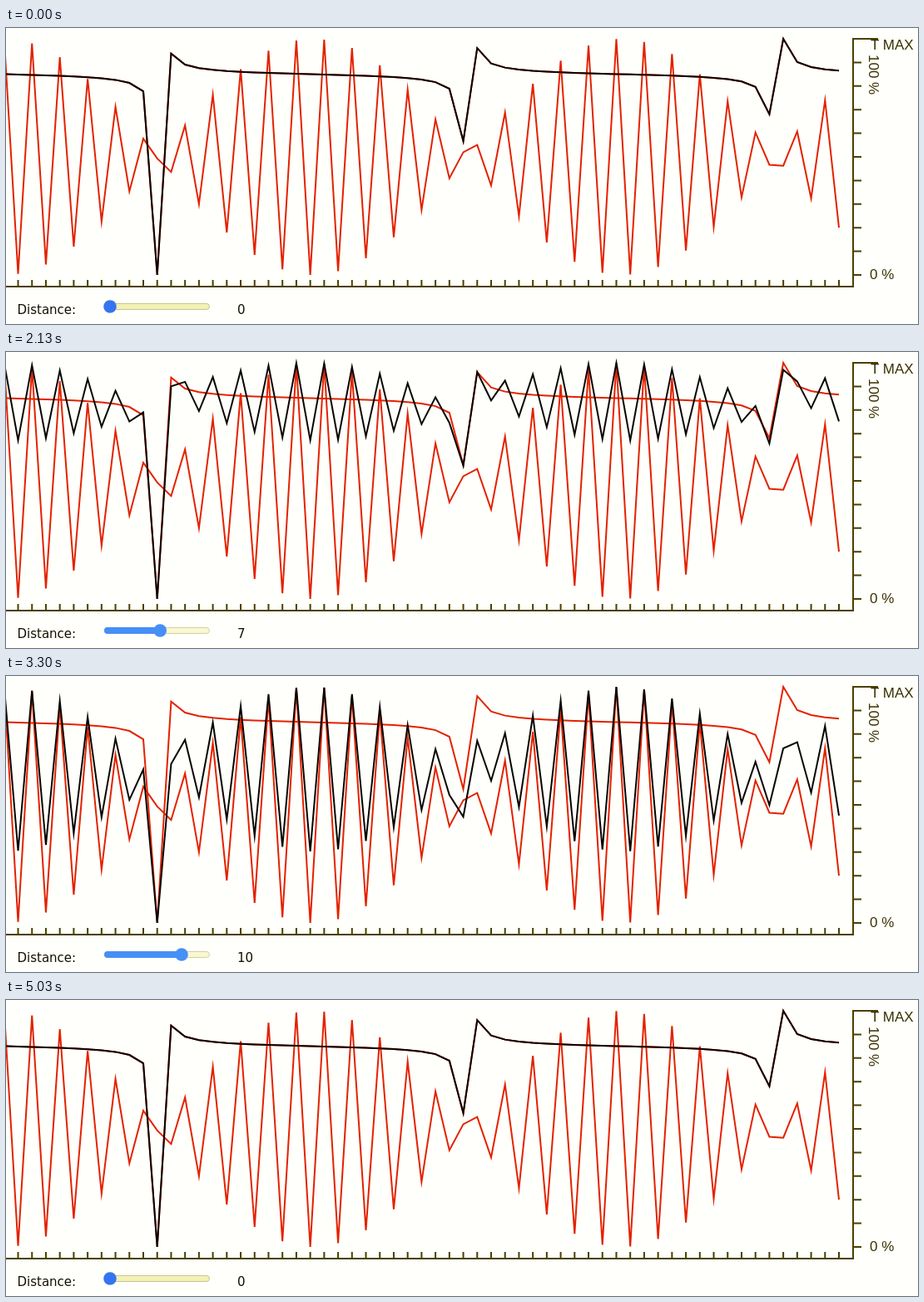
An HTML page that plays this animation: 1096 px wide and 356 px high, repeating every 6130 ms.

```html
<!DOCTYPE html>
<html lang="en">
<head>
<meta charset="utf-8">
<title>Distance</title>
<style>
html, body { margin: 0; width: 100%; height: 100%; overflow: hidden; background: #fffffb; }
svg { display: block; width: 1096px; height: 356px; }
.axis { fill: none; stroke: #4a4000; stroke-width: 2; }
.curve { fill: none; stroke: #e32200; stroke-width: 2; stroke-miterlimit: 10; }
#mix { stroke: #080400; }
.scale { font: 17px "Liberation Sans", Arial, sans-serif; fill: #3a3000; }
.label { font: 15px "DejaVu Sans", Verdana, sans-serif; fill: #151000; }
</style>
</head>
<body>
<svg viewBox="0 0 1096 356">
  <path id="axis" class="axis"/>
  <text class="scale" x="1039" y="26">T MAX</text>
  <text class="scale" transform="translate(1037 32) rotate(90)">100 %</text>
  <text class="scale" x="1038" y="302">0 %</text>
  <path id="tan" class="curve"/>
  <path id="cos" class="curve"/>
  <path id="mix" class="curve"/>
  <text class="label" x="13.5" y="344">Distance:</text>
  <rect id="track" x="118.5" y="331.5" width="126" height="7" rx="3.5"/>
  <rect id="fill" x="118" y="331" height="8" rx="4"/>
  <circle id="thumb" cy="335" r="7.8"/>
  <text id="value" class="label" x="278" y="344"></text>
</svg>
<script>
const LOOP = 6130, COUNT = 60, TOP = 13, BOTTOM = 297;
const $ = id => document.getElementById(id);
const xAt = n => -2.2 + 16.72 * n;
const sample = f => Array.from({ length: COUNT + 1 }, (_, n) => f(3 * n));
const tans = sample(Math.tan), coss = sample(Math.cos);
const tanMax = Math.max(...tans);

// Polyline stretched so that its extremes touch 0 % and 100 %.
function plot(values) {
  const max = Math.max(...values), min = Math.min(...values);
  const k = (BOTTOM - TOP) / (max - min);
  return 'M' + values.map((v, n) => `${xAt(n).toFixed(2)} ${(TOP + (max - v) * k).toFixed(2)}`).join('L');
}

function blend(d) {
  const t = d / tanMax;
  return tans.map((v, n) => v * (1 - t) + coss[n] * d);
}

// Moments at which the slider moves by one.
const ups = [1500, 1600, 1700, 1800, 1915, 2030, 2130, 2230, 2300, 2370, 2430, 2500, 2570];
const downs = [3100, 3170, 3250, 3330, 3430, 3730, 3870, 3940, 4010, 4085, 4160, 4230, 4430];
const passed = (list, t) => list.filter(at => at <= t).length;

const looks = {
  idle: { thumb: '#3474f0', track: '#f3f2b4', edge: '#c9c391' },
  hover: { thumb: '#2360c8', track: '#eae8b0', edge: '#bdb78a' },
  active: { thumb: '#468ff6', track: '#faf8d2', edge: '#d3cfa4' }
};

function lookAt(t) {
  if (t >= 1330 && t < 4570) return looks.active;
  return t >= 500 && t < 5000 ? looks.hover : looks.idle;
}

let shown = -1;
function render(t) {
  const d = passed(ups, t) - passed(downs, t);
  const look = lookAt(t);
  const x = 125 + 8.6 * d;
  if (d !== shown) {
    $('mix').setAttribute('d', plot(blend(d)));
    $('value').textContent = d;
    $('thumb').setAttribute('cx', x);
    $('fill').setAttribute('width', x - 118);
    shown = d;
  }
  $('track').setAttribute('fill', look.track);
  $('track').setAttribute('stroke', look.edge);
  $('fill').setAttribute('fill', look.thumb);
  $('thumb').setAttribute('fill', look.thumb);
}

let axis = 'M0 311H1018V13H1048';
for (let i = 1; i <= 10; i++) axis += `M1018 ${TOP + 28.4 * i}h10`;
for (let n = 1; n <= COUNT; n++) axis += `M${xAt(n).toFixed(2)} 303v8`;
$('axis').setAttribute('d', axis);
$('tan').setAttribute('d', plot(tans));
$('cos').setAttribute('d', plot(coss));

const start = performance.now();
function tick() {
  render((performance.now() - start) % LOOP);
  requestAnimationFrame(tick);
}
tick();
</script>
</body>
</html>
```
